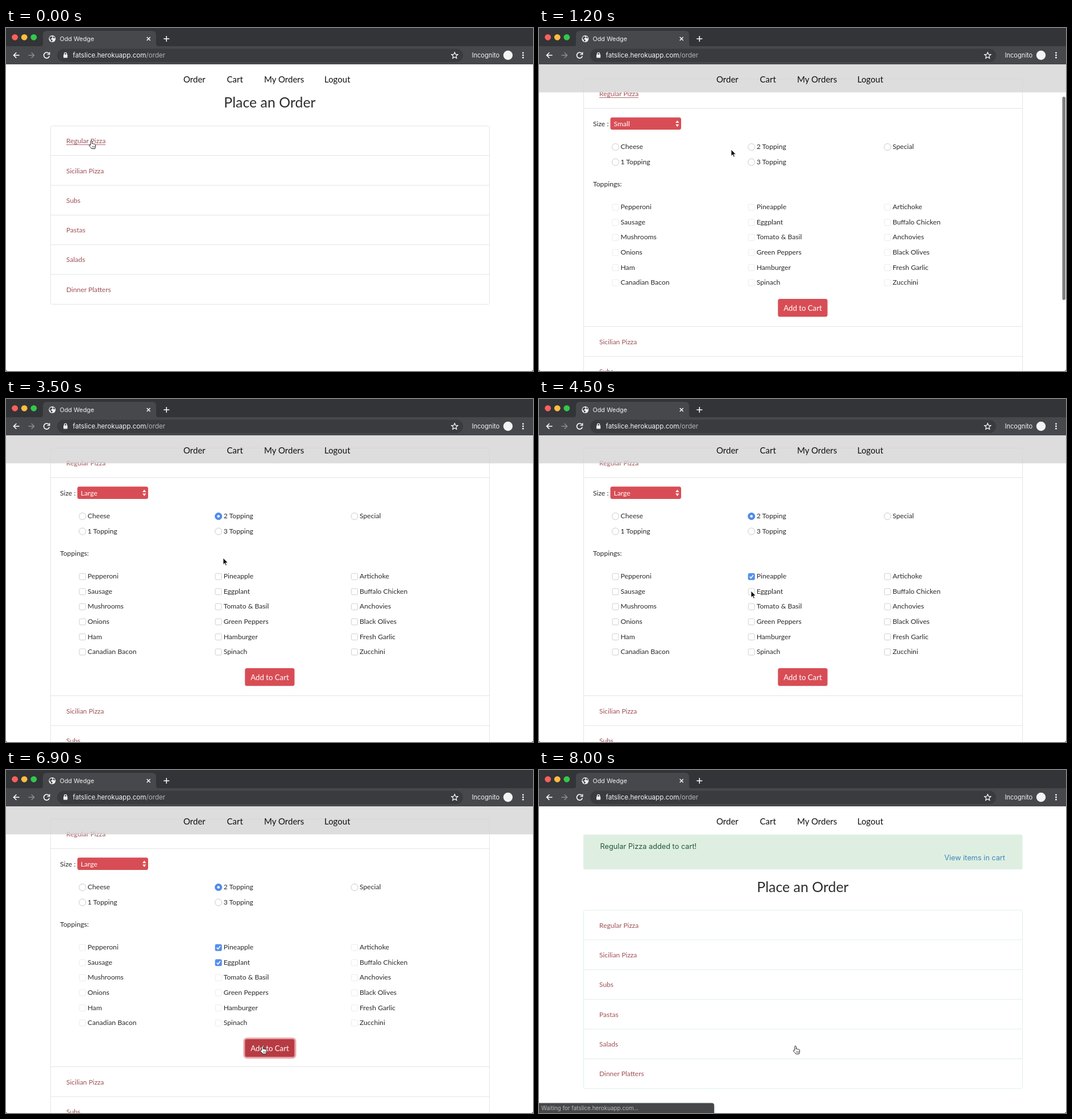
An HTML page that plays this animation: 927 px wide and 604 px high, repeating every 8100 ms.

```html
<!DOCTYPE html>
<html lang="en">
<head>
<meta charset="utf-8">
<title>Place an Order</title>
<style>
html, body { margin: 0; width: 100%; height: 100%; overflow: hidden; background: #fff; }
svg { display: block; width: 927px; height: 604px; }
text { font-family: Lato, sans-serif; font-size: 12.2px; fill: #2a2a2a; white-space: pre; }
.ui, .ui text { font-family: Inter, sans-serif; }
.link { font-size: 12px; fill: #9f5056; }
.nav { font-size: 15px; fill: #111; }
.title { font-size: 24.9px; fill: #2e2e2e; }
.alert text { font-size: 12.75px; }
.line { fill: none; stroke: #e4e4e4; }
.icon { fill: none; stroke: #fff; stroke-width: 1.6; }
</style>
</head>
<body>
<svg id="stage" viewBox="0 0 927 604" xmlns="http://www.w3.org/2000/svg"></svg>
<script>
const LOOP = 8100, STEP = 100;
const BODY_H = 384, ROW_H = 52.3, CARD_Y = 172, SCROLL = 86;
const COLS = [134.5, 373.7, 613];
const MENU = ['Regular Pizza', 'Sicilian Pizza', 'Subs', 'Pastas', 'Salads', 'Dinner Platters'];
const KINDS = [['Cheese', '1 Topping'], ['2 Topping', '3 Topping'], ['Special']];
const TOPPINGS = [
  ['Pepperoni', 'Sausage', 'Mushrooms', 'Onions', 'Ham', 'Canadian Bacon'],
  ['Pineapple', 'Eggplant', 'Tomato & Basil', 'Green Peppers', 'Hamburger', 'Spinach'],
  ['Artichoke', 'Buffalo Chicken', 'Anchovies', 'Black Olives', 'Fresh Garlic', 'Zucchini']
];

// moments of the story, in ms
const AT = { open: 600, popup: 1900, hoverLarge: 2100, picked: 2400, radio: 3200,
  first: 4000, second: 4700, hover: 6500, submit: 6800, status: 7200, reload: 7700 };
// pointer tip: time, x, y
const PATH = [[0, 150, 198.5], [600, 150, 198.5], [1000, 338, 214], [1400, 338, 214],
  [1800, 190, 166], [1900, 190, 166], [2100, 217, 188], [2400, 217, 188],
  [3100, 373, 206], [3200, 373, 206], [3500, 382, 280], [3900, 373, 311],
  [4100, 373, 311], [4500, 373, 338], [5000, 373, 338], [5400, 373, 369],
  [5800, 373, 369], [6500, 451, 486], [8100, 451, 486]];
const PRESSES = [[500, 600], [1800, 1900], [2200, 2300], [3100, 3200], [3900, 4000], [4600, 4700], [6700, 6800]];

const esc = s => s.replace(/&/g, '&amp;');
const text = (x, y, s, attr = '') => `<text x="${x}" y="${y}" ${attr}>${esc(s)}</text>`;
const rect = (x, y, w, h, attr = '') => `<rect x="${x}" y="${y}" width="${w}" height="${h}" ${attr}/>`;
const circle = (x, y, r, attr = '') => `<circle cx="${x}" cy="${y}" r="${r}" ${attr}/>`;
const path = (d, attr = '') => `<path d="${d}" ${attr}/>`;
const hline = (y, attr = '') => path(`M78.5 ${y}H850.5`, 'class="line" ' + attr);
const grid = (cols, fn) => cols.map((c, i) => c.map((s, j) => fn(s, i, j)).join('')).join('');

function radio(s, i, j) {
  const y = 292.5 + 26.6 * j;
  return circle(COLS[i], y, 6, 'fill="#fff" stroke="#c9c9c9"') + text(COLS[i] + 9, y + 3.8, s);
}

function checkbox(s, i, j) {
  const y = 398.7 + 26.55 * j;
  return rect(COLS[i] - 5.5, y - 5.5, 11, 11, 'class="box" rx="2" fill="#fff"') +
    text(COLS[i] + 9, y + 3.6, s);
}

function tick(id, y) {
  return `<g id="${id}">` + rect(COLS[1] - 6, y - 6, 12, 12, 'rx="2.5" fill="#5590ec"') +
    path(`M${COLS[1] - 3} ${y + .2}l2.2 2.4 4-5.2`, 'class="icon"') + '</g>';
}

function menuRow(s, i) {
  const y = CARD_Y + i * ROW_H;
  return (i > 1 ? hline(y + .5) : '') + text(106, y + 31.2, s, 'class="link"');
}

function page() {
  return `<g id="page">` +
    `<g id="alert" class="ui alert">` + rect(78, 113.5, 772.5, 61.5, 'rx="3" fill="#deefe1"') +
    text(107.5, 139.4, 'Regular Pizza added to cart!', 'style="fill:#245738"') +
    text(820, 159.4, 'View items in cart', 'text-anchor="end" style="fill:#4186bd"') + '</g>' +
    `<g id="list">` +
    text(464, 140, 'Place an Order', 'class="title" text-anchor="middle"') +
    rect(78.5, CARD_Y + .5, 772, 314, 'id="card" class="line" rx="3"') +
    menuRow(MENU[0], 0) + path('M106 205.5H175', 'id="under" stroke="#a8646a"') +
    hline(CARD_Y + ROW_H + .2) +
    `<g id="body" clip-path="url(#fold)">` + form() + '</g>' +
    `<g id="rest">` + MENU.map((s, i) => i ? menuRow(s, i) : '').join('') +
    hline(CARD_Y + ROW_H + .2, 'id="divider"') + '</g></g></g>';
}

function form() {
  return text(95, 256, 'Size :') +
    rect(125.5, 240.3, 124.5, 21.7, 'rx="3.5" fill="#d84d55"') +
    text(131.5, 256, 'Small', 'id="size" style="fill:#fff"') +
    path('M240.2 250l3.1-4.4 3.1 4.4zM240.2 252.6l3.1 4.4 3.1-4.4z', 'fill="#fff"') +
    grid(KINDS, radio) +
    `<g id="dot">` + circle(COLS[1], 292.5, 6.5, 'fill="#4f8cec"') + circle(COLS[1], 292.5, 2.3, 'fill="#fff"') + '</g>' +
    text(95, 362.4, 'Toppings:') +
    grid(TOPPINGS, checkbox) + tick('tick1', 398.7) + tick('tick2', 425.25) +
    rect(419, 558.7, 90, 34, 'id="ring" rx="5" fill="none" stroke="#e9a5aa" stroke-width="3"') +
    rect(420.3, 560, 87.2, 31.3, 'id="button" rx="3.5"') +
    text(464, 580.8, 'Add to Cart', 'text-anchor="middle" style="font-size:13.2px;fill:#fff"');
}

function nav() {
  return rect(0, 64, 927, 49.3, 'id="navBg"') +
    [['Order', 312], ['Cart', 388.5], ['My Orders', 454], ['Logout', 560]]
      .map(([s, x]) => text(x, 95.6, s, 'class="nav"')).join('');
}

function popup() {
  return `<g id="popup" class="ui">` +
    rect(115.5, 153, 127, 44, 'rx="4.5" fill="#9c525a" filter="url(#soft)"') +
    rect(115.5, 174.5, 127, 19.5, 'id="pick" fill="#4f95f8"') +
    path('M121 165.3l2.4 3 4.2-6.6', 'class="icon"') +
    text(134, 169.4, 'Small', 'style="font-size:12.7px;fill:#fff"') +
    text(134, 187.9, 'Large', 'style="font-size:12.7px;fill:#fff"') + '</g>';
}

function browser() {
  const lights = ['#fc605b', '#fdbd3f', '#34c84a']
    .map((c, i) => circle(15.6 + 16.6 * i, 16.3, 5.4, `fill="${c}"`)).join('');
  return `<g class="ui">` + rect(0, 0, 927, 33, 'fill="#333438"') + rect(0, 32, 927, 32, 'fill="#47484c"') +
    path('M59 33q6 0 6-6V12q0-7 7-7H257q7 0 7 7V27q0 6 6 6z', 'fill="#47484c"') + lights +
    circle(81.3, 19, 6, 'fill="#f1f1f1"') +
    path('M77 16l3-1.5 2 1.5-1 2-2 .5 1 2 2 .6-1 3-2-1-.5-2.6-2-1.5zM83 14.5l3 2-.5 2-2.5-1z', 'fill="#47484c"') +
    text(94.5, 22.8, 'Odd Wedge', 'style="font-size:10.8px;fill:#f2f2f2"') +
    path('M247.7 16l6 6m0-6l-6 6', 'class="icon" style="stroke-width:1.4"') +
    path('M282.3 14v10m-5-5h10', 'class="icon" style="stroke-width:1.5"') +
    path('M23.5 48H13.5m4.8-4.8L13.5 48l4.8 4.8', 'class="icon"') +
    path('M39.5 48h10m-4.8-4.8L49.5 48l-4.8 4.8', 'class="icon" style="stroke:#8b8c8f"') +
    path('M75.3 44.8a5 5 0 1 0 1 4.7M76.6 42.5v4h-4', 'class="icon"') +
    rect(90, 36.5, 714, 23.5, 'rx="11.7" fill="#3a3b3f"') +
    rect(101, 46.5, 7.2, 6, 'rx="1" fill="#eee"') +
    path('M102.6 47v-1.7a2 2 0 0 1 4 0V47', 'class="icon" style="stroke-width:1.3"') +
    `<text x="117.5" y="52.2" style="font-size:11.65px;fill:#f5f5f5">fatslice.herokuapp.com<tspan fill="#b2b3b6">/order</tspan></text>` +
    path('M789.2 42.7l1.6 3.7 4 .3-3 2.6.9 4-3.5-2.1-3.5 2.1.9-4-3-2.6 4-.3z', 'class="icon" style="stroke-width:1.2"') +
    text(819.5, 52.2, 'Incognito', 'style="font-size:11.1px;fill:#f2f2f2"') +
    circle(883, 48, 8.2, 'fill="#f4f4f4"') +
    [43.8, 48, 52.2].map(y => circle(909.5, y, 1.4, 'fill="#fff"')).join('') + '</g>';
}

function overlay() {
  return rect(920.5, 66, 5.5, 358, 'id="thumb" rx="2.7" fill="#7d7d7d"') +
    `<g id="status" class="ui">` + path('M-6 610V586.5H304q4 0 4 4V610z', 'fill="#45474a" filter="url(#soft)"') +
    text(4, 599.3, 'Waiting for fatslice.herokuapp.com...', 'style="font-size:9.9px;fill:#b9babc"') + '</g>' +
    path('M0 604v-3q0 3 3 3zM927 604v-3q0 3-3 3z', 'fill="#333"') +
    `<g id="pointer">` + circle(0, 0, 18, 'id="press" fill="none" stroke="#222" stroke-width="1.5"') +
    path('M0 0V11.5l2.7-2.4 1.8 4.2 1.9-.8-1.8-4.1H8.3z', 'id="arrow" stroke="#fff" stroke-width=".8" fill="#111"') +
    `<g id="hand" transform="translate(-4.2 -.5)" stroke="#222">` +
    path('M3 8V1.8a1.3 1.3 0 0 1 2.6 0V6c.4-1 2-.7 2.1.4.5-.9 2-.6 2.1.5.6-.7 1.900-.2 1.900.9v3.300c0 1.200-1 2-1 3.400H4.800C4.600 13 1.100 10.700.5 9c-.4-1.200 1.500-1.700 2.500-.5z'.replace(/00/g, ''), 'fill="#fff"') +
    path('M6.100 9.700v2.800M8 9.700v2.800M9.800 9.700v2.800'.replace(/00/g, ''), 'stroke-width=".7"') + '</g></g>';
}

const stage = document.getElementById('stage');
stage.innerHTML = `<defs><clipPath id="fold"><rect id="foldBox" x="78" y="225" width="773" height="0"/></clipPath>` +
  `<filter id="soft" x="-10%" y="-40%" width="120%" height="190%"><feDropShadow dx="0" dy="1.5" stdDeviation="2" flood-opacity=".3"/></filter></defs>` +
  rect(0, 0, 927, 604, 'fill="#fff"') + page() + nav() + popup() + browser() + overlay();

const el = {};
stage.querySelectorAll('[id]').forEach(n => el[n.id] = n);
const boxes = stage.querySelectorAll('.box'), lines = stage.querySelectorAll('.line');
const set = (id, attrs) => { for (const k in attrs) el[id].setAttribute(k, attrs[k]); };
const show = (id, on) => set(id, { display: on ? 'inline' : 'none' });
const clamp = v => Math.max(0, Math.min(1, v));
const smooth = p => p * p * (3 - 2 * p);

function pointerAt(t) {
  const i = PATH.findIndex((k, n) => n && t <= k[0]);
  const [t0, x0, y0] = PATH[i - 1], [t1, x1, y1] = PATH[i];
  const p = smooth((t - t0) / (t1 - t0));
  return [x0 + (x1 - x0) * p, y0 + (y1 - y0) * p];
}

function draw(now) {
  const t = Math.floor(now % LOOP / STEP) * STEP;
  const done = t >= AT.reload;
  const fold = done ? 0 : BODY_H * smooth(clamp((t - AT.open + 100) / 400));
  const scroll = done ? 0 : SCROLL * (1 - (1 - clamp((t - 900) / 400)) ** 2.4);
  const [x, y] = pointerAt(t);

  set('page', { transform: `translate(0 ${-scroll})` });
  set('list', { transform: `translate(0 ${done ? 74.5 : 0})` });
  set('rest', { transform: `translate(0 ${fold})` });
  set('card', { height: 314 + fold });
  set('foldBox', { height: Math.max(0, fold - 1) });
  show('body', fold > 0);
  show('divider', fold > 0);
  show('alert', done);
  show('under', t < AT.popup);
  set('navBg', { fill: scroll > 0 ? '#d5d5d5' : '#fff', 'fill-opacity': scroll > 0 ? .8 : 1 });
  lines.forEach(n => n.style.stroke = done ? '#dfefec' : '#e4e4e4');

  el.size.textContent = t < AT.picked ? 'Small' : 'Large';
  show('popup', t >= AT.popup && t < AT.picked);
  set('pick', { y: t < AT.hoverLarge ? 155 : 174.5 });
  const free = t >= AT.radio && t < AT.second;
  boxes.forEach(n => n.setAttribute('stroke', free ? '#cfcfcf' : '#ebebeb'));
  show('dot', t >= AT.radio);
  show('tick1', t >= AT.first);
  show('tick2', t >= AT.second);

  show('ring', t >= AT.submit);
  set('button', { fill: t >= AT.submit ? '#b83b43' : t >= AT.hover ? '#c4434b' : '#d84d55' });

  set('thumb', { y: 66 + scroll * .663, opacity: scroll > 0 ? clamp((1900 - t) / 300) : 0 });
  show('status', t >= AT.status);
  const hand = t < 700 || t >= AT.hover;
  set('pointer', { transform: `translate(${x} ${y})` });
  show('hand', hand);
  show('arrow', !hand);
  show('press', PRESSES.some(([a, b]) => t >= a && t < b));
}

const start = performance.now();
function loop() {
  draw(performance.now() - start);
  requestAnimationFrame(loop);
}
loop();
</script>
</body>
</html>
```
